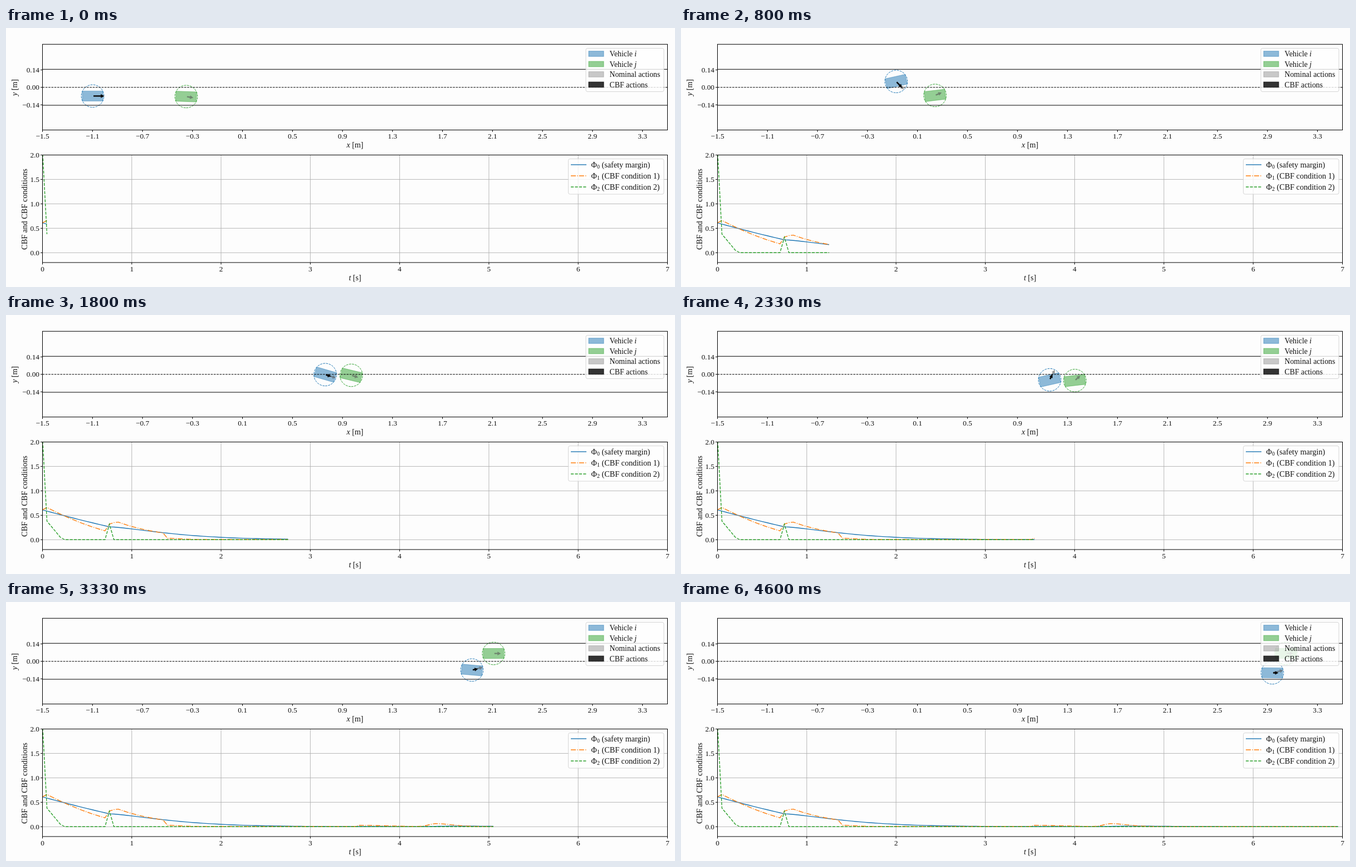
Write an HTML page that moves like this. It is 1201 px wide and 466 px high and loops after 4670 ms.

```html
<!DOCTYPE html>
<html lang="en">
<head>
<meta charset="utf-8">
<title>Vehicle safety conditions</title>
<style>
  html, body { margin: 0; width: 100%; height: 100%; overflow: hidden; background: #fdfdfd; }
  svg { display: block; width: 1201px; height: 466px; }
  text { font-family: "Liberation Serif", "Noto Serif", serif; fill: #111; }
  .mid { text-anchor: middle; }
  .end { text-anchor: end; }
</style>
</head>
<body>
<svg id="stage" viewBox="0 0 1201 466"></svg>
<script>
const LOOP = 4670;
const BLUE = "#1f77b4", ORANGE = "#ff7f0e", GREEN = "#2ca02c";
const LEFT = 65.5, RIGHT = 1187.5;
const stage = document.getElementById("stage");

function add(name, attrs, parent = stage) {
  const node = document.createElementNS("http://www.w3.org/2000/svg", name);
  for (const key in attrs) node.setAttribute(key, attrs[key]);
  parent.appendChild(node);
  return node;
}
const line = (x1, y1, x2, y2, extra) =>
  add("line", { x1, y1, x2, y2, stroke: "#000", "stroke-width": 1, ...extra });
const box = (x, y, x2, y2, extra) =>
  add("rect", { x, y, width: x2 - x, height: y2 - y, fill: "none", stroke: "#000", "stroke-width": 1, ...extra });
function label(markup, x, y, cls = "", size = 13.3, extra = {}) {
  add("text", { x, y, class: cls, "font-size": size, ...extra }).innerHTML = markup;
}
const italic = s => `<tspan font-style="italic">${s}</tspan>`;
const minus = s => s.replace("-", "\u2212");

const timeX = t => LEFT + t * (RIGHT - LEFT) / 7;
const valueY = v => 404.3 - v * 87.9;

// Motion: s counts the steps of 0.1 s. Each lane change is a logistic shift.
const shift = (s, mid, width) => 1 / (1 + Math.exp((mid - s) / width));
const bell = u => Math.exp(-u * u);

const leader = {
  x: s => 323.5 + 11.05 * s - 3.2 * bell((s - 35) / 12),
  y: s => 122.8 + 2.2 * shift(s, 1, 1) - 32 * shift(s, 17, 2.5)
    + 30 * shift(s, 27, 2.6) - 30.5 * shift(s, 38.7, 1.9)
};
const gap = s => 45 + 123 * Math.exp(-((Math.max(s, 0) / 8.1) ** 1.2)) - 21 * shift(s, 53.5, 4);
const follower = {
  x: s => leader.x(s) - gap(s),
  y: s => 122.4 - 30.5 * shift(s, 10, 1.1) + 31.5 * shift(s, 27.1, 2.4)
    - 28 * shift(s, 37, 1.5) + 29 * shift(s, 45, 2) + 3.5 * shift(s, 61, 4),
  actionLength: s => 10 + 10 * bell(s / 13),
  pull: s => -13 * shift(s, 52, 2)
};

function heading(path, s) {
  const d = 0.25;
  return Math.atan2(path.y(s + d) - path.y(s - d), path.x(s + d) - path.x(s - d)) * 180 / Math.PI;
}
const steering = (path, s) => heading(path, s) + 8 * (heading(path, s + 0.5) - heading(path, s - 0.5));

function arrowPath(length) {
  const neck = length - 6;
  return `M1.5-1.2H${neck}V-3.3L${length} 0L${neck} 3.3V1.2H1.5Z`;
}

function makeVehicle(path, color, nominalLength) {
  const group = add("g", {});
  const body = add("rect", { x: -18.5, y: -9, width: 37, height: 18, fill: color, "fill-opacity": 0.5,
    stroke: color, "stroke-opacity": 0.5, "stroke-width": 0.9 }, group);
  add("path", { d: "M0 20.3A20.3 20.3 0 1 0 0-20.3A20.3 20.3 0 1 0 0 20.3", fill: "none", stroke: color,
    "stroke-width": 1, "stroke-dasharray": "3.7 1.6" }, group);
  const nominal = add("path", { d: arrowPath(nominalLength), fill: "#555", opacity: 0.6 }, group);
  const action = path.actionLength && add("path", { fill: "#080808" }, group);
  return s => {
    const angle = steering(path, s);
    group.setAttribute("transform", `translate(${path.x(s)} ${path.y(s)})`);
    body.setAttribute("transform", `rotate(${heading(path, s)})`);
    nominal.setAttribute("transform", `rotate(${angle + (path.pull ? path.pull(s) : 0)})`);
    if (action) {
      action.setAttribute("d", arrowPath(path.actionLength(s) + 1));
      action.setAttribute("transform", `rotate(${angle})`);
    }
  };
}

// Conditions as functions of time in seconds
const bump = (t, peak, rise, fall) => bell((t - peak) / (t < peak ? rise : fall));

function margin(t) {
  if (t < 0.75) return 0.61 - 0.5 * t + 0.05 * t * t;
  return 0.262 * Math.exp(-(((t - 0.75) / 0.85) ** 1.4)) + 0.002 + 0.011 * bump(t, 4.6, 0.2, 0.6);
}
function condition1(t) {
  const u = t - 0.05;
  if (u < 0) return 0.61;
  if (t < 0.75) return 0.66 - 0.95 * u + 0.33 * u * u;
  if (t < 1.4) return Math.min(0.32 + 0.6 * (t - 0.75), 0.36 * Math.exp(-1.9 * (t - 0.85)));
  return 0.025 * bell((t - 1.4) / 0.2) + 0.005 * (1 - t / 7)
    + 0.026 * bump(t, 3.55, 0.03, 0.45) + 0.06 * bump(t, 4.4, 0.1, 0.27);
}
function condition2(t) {
  if (t === 0) return 2.1;
  return Math.max(0, 0.38 - 2.2 * (t - 0.05), 0.32 - 6.4 * Math.abs(t - 0.75));
}

function makeCurve(value, style) {
  const curve = add("polyline", { fill: "none", "clip-path": "url(#plot)", ...style });
  return s => {
    const points = Array.from({ length: 2 * s + 2 }, (_, k) => `${timeX(k / 20)},${valueY(value(k / 20))}`);
    curve.setAttribute("points", points.join(" "));
  };
}

// Road view
const vehicles = [makeVehicle(follower, BLUE, 20), makeVehicle(leader, GREEN, 13)];
line(LEFT, 74.3, RIGHT, 74.3);
line(LEFT, 139, RIGHT, 139);
line(LEFT, 106.8, RIGHT, 106.8, { "stroke-dasharray": "3.7 1.6" });
box(LEFT, 29.3, RIGHT, 183.5);
for (let k = 0; k <= 12; k++) {
  const x = LEFT + k * 89.76;
  line(x, 183.5, x, 187);
  label(minus((-1.5 + k * 0.4).toFixed(1)), x, 199.3, "mid");
}
for (const v of [0.14, 0, -0.14]) {
  const y = 106.8 - v * 224.4;
  line(62, y, LEFT, y);
  label(minus(v.toFixed(2)), 60, y + 4.4, "end");
}
label(italic("x") + " [m]", 626.5, 215, "mid", 14);
label(italic("y") + " [m]", 0, 0, "mid", 14, { transform: "translate(20 107) rotate(-90)" });

// Condition plot
add("rect", { x: LEFT, y: 228.5, width: RIGHT - LEFT, height: 193.5 }, add("clipPath", { id: "plot" }));
const grid = { stroke: "#b0b0b0", "stroke-width": 0.9 };
for (let t = 0; t <= 7; t++) {
  const x = timeX(t);
  line(x, 228.5, x, 422, grid);
  line(x, 422, x, 425.5);
  label(t, x, 437.5, "mid");
}
for (let v = 0; v <= 2; v += 0.5) {
  const y = valueY(v);
  line(LEFT, y, RIGHT, y, grid);
  line(62, y, LEFT, y);
  label(v.toFixed(1), 60, y + 4.4, "end");
}
const styles = [
  { stroke: BLUE, "stroke-width": 1.4 },
  { stroke: ORANGE, "stroke-width": 1.4, "stroke-dasharray": "9 2.2 1.4 2.2" },
  { stroke: GREEN, "stroke-width": 1.4, "stroke-dasharray": "5.2 2.2" }
];
const curves = [margin, condition1, condition2].map((value, i) => makeCurve(value, styles[i]));
box(LEFT, 228.5, RIGHT, 422);
label(italic("t") + " [s]", 626.5, 453.5, "mid", 14);
label("CBF and CBF conditions", 0, 0, "mid", 14.4, { transform: "translate(38 326) rotate(-90)" });

// Legends
const frame = { rx: 3, fill: "#fff", "fill-opacity": 0.8, stroke: "#ccc", "stroke-opacity": 0.8 };
box(1041, 36.5, 1181, 114.5, frame);
[["Vehicle " + italic("i"), BLUE, 0.5], ["Vehicle " + italic("j"), GREEN, 0.5],
 ["Nominal actions", "#808080", 0.43], ["CBF actions", "#000", 0.8]].forEach(([text, color, alpha], i) => {
  const y = 46.4 + i * 18.5;
  box(1046, y - 4.8, 1073, y + 4.8, { fill: color, "fill-opacity": alpha, stroke: color, "stroke-opacity": alpha });
  label(text, 1083.5, y + 4.6, "", 13.8);
});
box(1009.5, 235.5, 1181, 299, frame);
["(safety margin)", "(CBF condition 1)", "(CBF condition 2)"].forEach((text, i) => {
  const y = 246 + i * 20;
  line(1014, y, 1042, y, styles[i]);
  label("\u03a6", 1050.5, y + 4.6, "", 14);
  label(i, 1061, y + 7, "", 9.8);
  label(text, 1069.5, y + 4.6, "", 14.2);
});

// Steps last 66.7 ms, held on a 10 ms clock
function render(ms) {
  const step = Math.floor((Math.floor(ms / 10) + 0.5) * 0.15);
  [...vehicles, ...curves].forEach(draw => draw(step));
}
const start = performance.now();
function tick() {
  render((performance.now() - start) % LOOP);
  requestAnimationFrame(tick);
}
tick();
</script>
</body>
</html>
```
